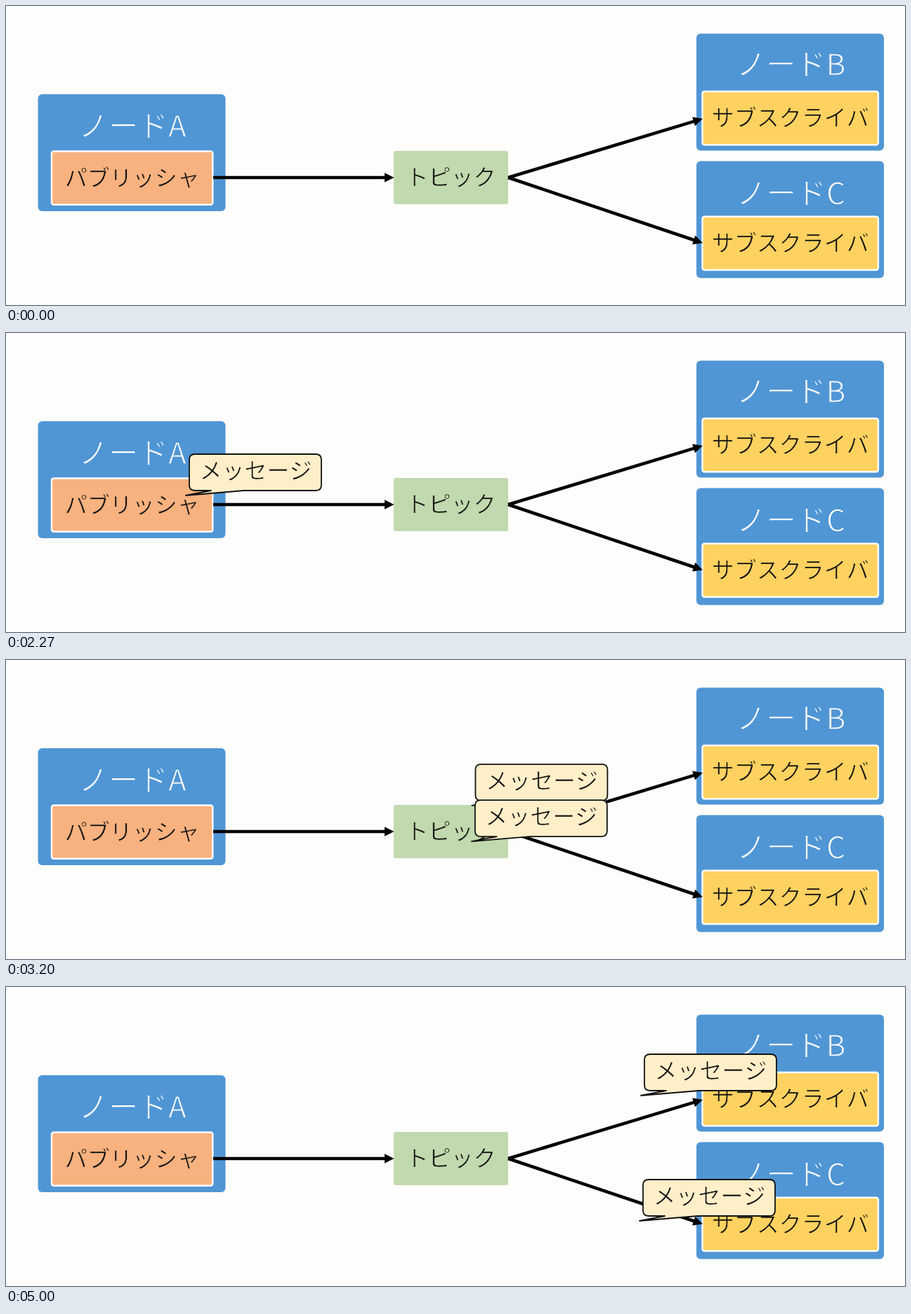
An HTML page that plays this animation: 1280 px wide and 427 px high, repeating every 5070 ms.

```html
<!DOCTYPE html>
<html lang="ja">
<head>
<meta charset="utf-8">
<style>
  html, body { margin: 0; width: 100%; height: 100%; overflow: hidden; background: #fdfdfb; }
  svg { display: block; width: 100%; height: 100%; }
  .node, .node + text { --bg: #5096d5; }
  .pub, .pub + text { --bg: #f7b27f; }
  .sub, .sub + text { --bg: #fed260; }
  .topic, .topic + text { --bg: #c1d9ae; }
  .bubble, .bubble + text { --bg: #ffefc9; }
  rect, .bubble { fill: var(--bg); }
  /* A stroke in the box colour thins the letters. */
  text {
    font: 300 32px "Noto Sans CJK JP", "Noto Sans CJK", sans-serif;
    text-anchor: middle; font-kerning: none;
    fill: #111; stroke: var(--bg); stroke-width: .7;
  }
  .title { font-size: 42.7px; fill: #fff; stroke-width: 1.3; }
  .part { stroke: #fff; stroke-width: 2.4; }
  .line { stroke: #000; stroke-width: 4.6; }
  .bubble { stroke: #111; stroke-width: 1.8; stroke-linejoin: round; }
</style>
</head>
<body>
<svg viewBox="0 0 1280 427">
  <defs>
    <g id="message">
      <path class="bubble" d="M8 0H180Q188 0 188 8V44Q188 52 180 52H78L-5 59L31 52H8Q0 52 0 44V8Q0 0 8 0Z"/>
      <text x="94.5" y="35">メッセージ</text>
    </g>
  </defs>
  <g id="scene"></g>
  <use id="upper" href="#message"/>
  <use id="lower" href="#message"/>
</svg>
<script>
const LOOP = 5070, FPS = 15;
const APPEAR = 1335, SEND = 2393, SPLIT = 2812, ARRIVE = 3892;
const START = [261, 173], TOPIC = [572, 170], END_B = [909, 96], END_C = [907, 275];

const rect = (cls, x, y, w, h, r) =>
  `<rect class="${cls}" x="${x}" y="${y}" width="${w}" height="${h}" rx="${r}"/>`;
const text = (s, x, y, cls = "") => `<text class="${cls}" x="${x}" y="${y}">${s}</text>`;

function node(name, x, y, titleY) {
  return rect("node", x, y, 267, 167, 6) + text(name, x + 134.5, titleY, "title");
}

function part(cls, label, x, y, w) {
  return rect("part " + cls, x, y, w, 76.3, 3) + text(label, x + w / 2, y + 49);
}

function arrow(x1, y1, x2, y2) {
  const len = Math.hypot(x2 - x1, y2 - y1);
  const angle = Math.atan2(y2 - y1, x2 - x1) * 180 / Math.PI;
  return `<g transform="translate(${x1} ${y1}) rotate(${angle})">
    <path class="line" d="M0 0H${len - 10}"/>
    <path d="M${len} 0l-13.5 -6.7v13.4z"/></g>`;
}

const byId = id => document.getElementById(id);
const upper = byId("upper"), lower = byId("lower");

byId("scene").innerHTML =
  node("ノードA", 45.5, 126, 186.5) +
  node("ノードB", 983, 39.5, 98.5) +
  node("ノードC", 983, 221.5, 282.5) +
  part("pub", "パブリッシャ", 65, 207.5, 229.3) +
  part("sub", "サブスクライバ", 991.5, 122, 250.4) +
  part("sub", "サブスクライバ", 991.5, 300.7, 250.4) +
  rect("topic", 552, 207, 163, 76, 3) + text("トピック", 633.5, 256) +
  arrow(295, 245, 552.5, 245) +
  arrow(715, 245, 992, 161) +
  arrow(715, 245, 992, 338.5);

function ease(t, from, to) {
  const u = Math.min(1, Math.max(0, (t - from) / (to - from)));
  return (1 - Math.cos(Math.PI * u)) / 2;
}

const mix = (a, b, k) => a.map((v, i) => v + (b[i] - v) * k);

function place(el, pos, shown) {
  el.setAttribute("transform", `translate(${pos})`);
  el.setAttribute("visibility", shown ? "visible" : "hidden");
}

function draw(now) {
  const t = Math.floor((now % LOOP + 5) * FPS / 1000) * 1000 / FPS;
  const base = mix(START, TOPIC, ease(t, SEND, SPLIT));
  const k = ease(t, SPLIT, ARRIVE);
  place(upper, mix(base, END_B, k), t > SPLIT);
  place(lower, mix(base, END_C, k), t >= APPEAR);
  requestAnimationFrame(draw);
}

draw(0);
</script>
</body>
</html>
```
